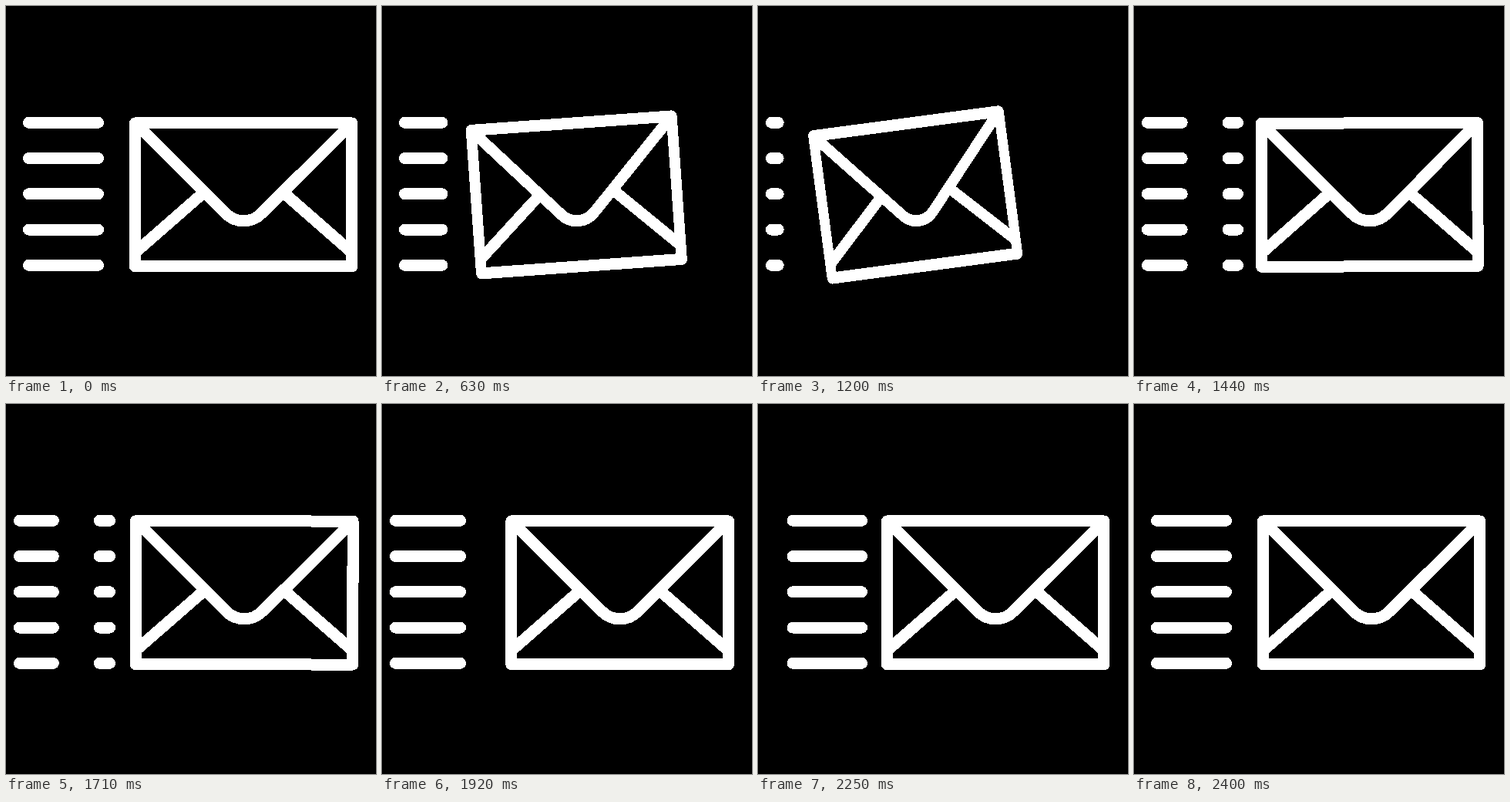
Write an HTML page that moves like this. It is 480x480 px and loops after 2430 ms.

```html
<!DOCTYPE html>
<html lang="en">
<head>
<meta charset="utf-8">
<title>Sending mail</title>
<style>
  html, body { margin: 0; width: 100%; height: 100%; overflow: hidden; background: #000; }
  svg { display: block; }
  path {
    fill: none; stroke: #fff; stroke-width: 15;
    stroke-linecap: round; stroke-linejoin: round;
    shape-rendering: crispEdges;
  }
</style>
</head>
<body>
<svg width="480" height="480" viewBox="0 0 480 480">
  <path id="lines"/>
  <path id="envelope" d="M-140.7-93H140.7V93H-140.7Z
    L-23 24.4A32.6 32.6 0 0 0 23 24.4L140.7-93
    M-51-3.5L-140.7 75M51-3.5L140.7 75"/>
</svg>
<script>
const lines = document.getElementById('lines');
const envelope = document.getElementById('envelope');
const LOOP = 2430, STEP = 30, HOLD = 630;

const clamp = x => Math.min(1, Math.max(0, x));
const span = (t, start, end) => clamp((t - start) / (end - start));
const smooth = x => x * x * (3 - 2 * x);
const cubicInOut = x => x < .5 ? 4 * x ** 3 : 1 - 4 * (1 - x) ** 3;

// 0 = at rest on the right, 1 = pulled back to the left
function pullAt(t) {
  if (t < HOLD) return 0;
  if (t < 990) return smooth(span(t, 357, 977));
  const settle = .007 * Math.sin(Math.PI * span(t, 1500, 2000));
  return 1 - cubicInOut(span(t, 990, 1530)) - settle;
}

function moveEnvelope(pull) {
  envelope.setAttribute('transform',
    `translate(${308.2 - 136 * pull} 244.9) rotate(${-9.9 * pull}) scale(${1 - .18 * pull} 1)`);
}

// Dashes run left along a track that shortens as the envelope pulls back
function drawSpeedLines(t, pull) {
  const period = 150, trackStart = 17.5;
  const trackEnd = 134.5 - 117 * clamp(1.25 * pull - .03);
  const shift = 4 * period * (1 - smooth(span(t, 810, 2403))) % period;
  let d = '';
  for (let x = 29.5 + shift - period; x < trackEnd; x += period) {
    const from = Math.max(trackStart, x), to = Math.min(trackEnd, x + 90);
    if (from >= to) continue;
    for (let row = 0; row < 5; row++) d += `M${from} ${151.3 + 46.25 * row}H${to}`;
  }
  lines.setAttribute('d', d);
}

function draw() {
  const t = Math.floor(performance.now() % LOOP / STEP) * STEP;
  const pull = pullAt(t);
  drawSpeedLines(t, pull);
  moveEnvelope(pull);
  requestAnimationFrame(draw);
}
draw();
</script>
</body>
</html>
```
